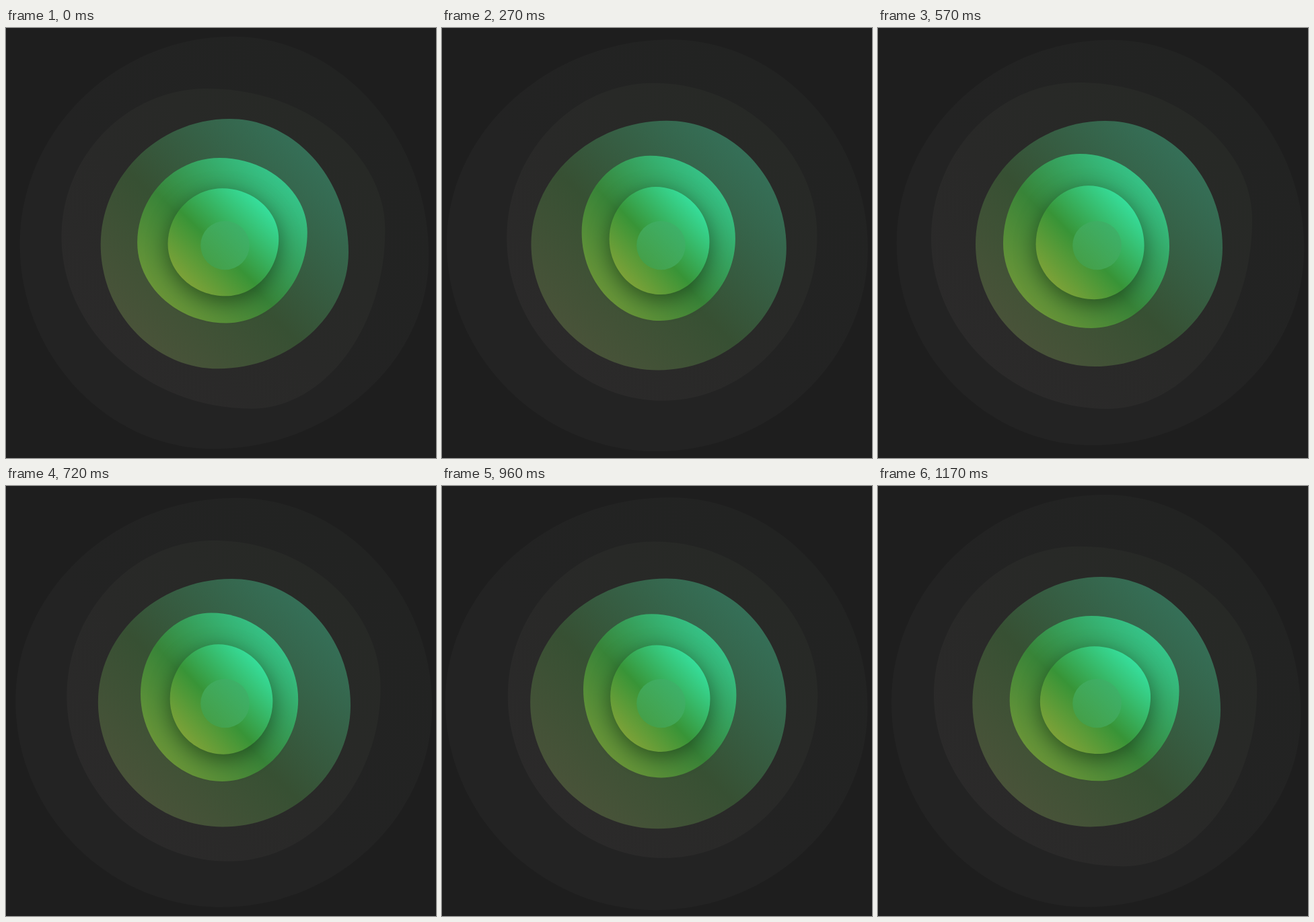
Recreate the animation shown at these times as an HTML page. Size 639 by 639 pixels, loop 1200 ms.

```html
<!DOCTYPE html>
<html lang="en">
<head>
<meta charset="utf-8">
<title>Pulsing blobs</title>
<style>
  html, body { margin: 0; width: 100%; height: 100%; overflow: hidden; background: #1e1e1e; }
  svg { display: block; width: 100vw; height: 100vh; }
</style>
</head>
<body>
<svg id="stage" viewBox="0 0 639 639"></svg>
<script>
const LOOP = 1200, STEP = 30, KAPPA = 0.547;
const CENTER = [325.5, 323];
const stage = document.getElementById('stage');

// Left, top, right and bottom extreme points as x, y pairs:
// the relaxed shape, its change when stretched and its change when twisted.
const core = {
  rest: [186, 320, 300, 187, 433, 324, 317, 446],
  stretch: [24, -19, 9, 2.5, 2, -11, 7, -12],
  twist: [0, 6, 14, 5, 14, -16, 8, -3]
};
const ring = {
  rest: [145, 321, 338, 138, 512, 326, 322, 503],
  stretch: [-14, 0, -4, 0, 0, 0, 0, 6],
  twist: [1, 1, -4, -3, -3, 7, -7, 1]
};
const halo = {
  rest: [79, 312, 298, 81, 556, 285, 340, 566],
  stretch: [19.5, 0, 19, 0, 1, 26, -16, -14],
  twist: [-4, -2, -7, 9, 7, 5, 31, 5]
};

// reach scales the extents, lean scales the sideways shift of each extreme.
const layers = [
  { shape: ring, reach: 1.65, lean: 1.65, colors: ['#232323', '#232323', '#222322'] },
  { shape: halo, reach: 1, lean: 1, colors: ['#2b2a2a', '#292928', '#272926'] },
  { shape: ring, reach: 1, lean: 1, colors: ['#495339', '#375033', '#356f57'] },
  { shape: core, reach: 1, lean: 1, colors: ['#6b9538', '#388438', '#35c388'] },
  { shape: core, reach: 0.652, lean: 0.5, colors: ['#7ea238', '#389437', '#36de9b'], shadow: true }
];

function add(parent, tag, attrs) {
  const el = document.createElementNS('http://www.w3.org/2000/svg', tag);
  for (const name in attrs) el.setAttribute(name, attrs[name]);
  return parent.appendChild(el);
}

function gradient(id, colors, stops) {
  const g = add(stage, 'linearGradient', { id, x1: 0, y1: 1, x2: 1, y2: 0 });
  colors.forEach((c, i) => add(g, 'stop', { offset: stops[i], 'stop-color': c }));
  return `url(#${id})`;
}

const filter = add(stage, 'filter', {
  id: 'shadow', x: '-50%', y: '-50%', width: '200%', height: '200%',
  'color-interpolation-filters': 'sRGB'
});
add(filter, 'feDropShadow', { dx: 0, dy: 8, stdDeviation: 16, 'flood-color': '#000', 'flood-opacity': 0.42 });

layers.forEach((layer, i) => {
  layer.el = add(stage, 'path', { fill: gradient('tone' + i, layer.colors, [0.14, 0.45, 0.85]) });
  if (layer.shadow) layer.el.setAttribute('filter', 'url(#shadow)');
});
add(stage, 'circle', {
  cx: CENTER[0], cy: CENTER[1], r: 36.3,
  fill: gradient('dot', ['#459f48', '#3db16a'], [0.12, 0.88])
});

const easeOut = u => 1 - (1 - u) ** 1.8;
const easeInOut = u => (1 - Math.cos(Math.PI * u)) / 2;

// Stretch jumps up quickly and settles back softly, twice per loop.
const beats = [[0, 0.38], [390, 0.97], [570, 0], [960, 1], [LOOP, 0.38]];

function stretchAt(t) {
  const i = beats.findIndex(([time]) => time > t);
  const [t0, a] = beats[i - 1], [t1, b] = beats[i];
  const ease = b > a ? easeOut : easeInOut;
  return a + (b - a) * ease((t - t0) / (t1 - t0));
}

// Twist is a single bump around the loop seam.
function twistAt(t) {
  const away = Math.min(t, LOOP - t);
  return 1 - easeInOut(Math.min(away / 330, 1));
}

function pose({ shape, reach, lean }, stretch, twist) {
  return shape.rest.map((v, j) => {
    const c = CENTER[j % 2];
    const outward = j % 4 === 0 || j % 4 === 3;
    const p = v + shape.stretch[j] * stretch + shape.twist[j] * twist;
    return c + (p - c) * (outward ? reach : lean);
  });
}

function outline([lx, ly, tx, ty, rx, ry, bx, by]) {
  const mix = (a, b) => a + (b - a) * KAPPA;
  return `M${lx} ${ly}` +
    `C${lx} ${mix(ly, ty)} ${mix(tx, lx)} ${ty} ${tx} ${ty}` +
    `C${mix(tx, rx)} ${ty} ${rx} ${mix(ry, ty)} ${rx} ${ry}` +
    `C${rx} ${mix(ry, by)} ${mix(bx, rx)} ${by} ${bx} ${by}` +
    `C${mix(bx, lx)} ${by} ${lx} ${mix(ly, by)} ${lx} ${ly}Z`;
}

function draw(ms) {
  const t = Math.floor((ms % LOOP) / STEP) * STEP;
  const stretch = stretchAt(t), twist = twistAt(t);
  for (const layer of layers) {
    layer.el.setAttribute('d', outline(pose(layer, stretch, twist)));
  }
}

const start = performance.now();
function tick() {
  draw(performance.now() - start);
  requestAnimationFrame(tick);
}
tick();
</script>
</body>
</html>
```
